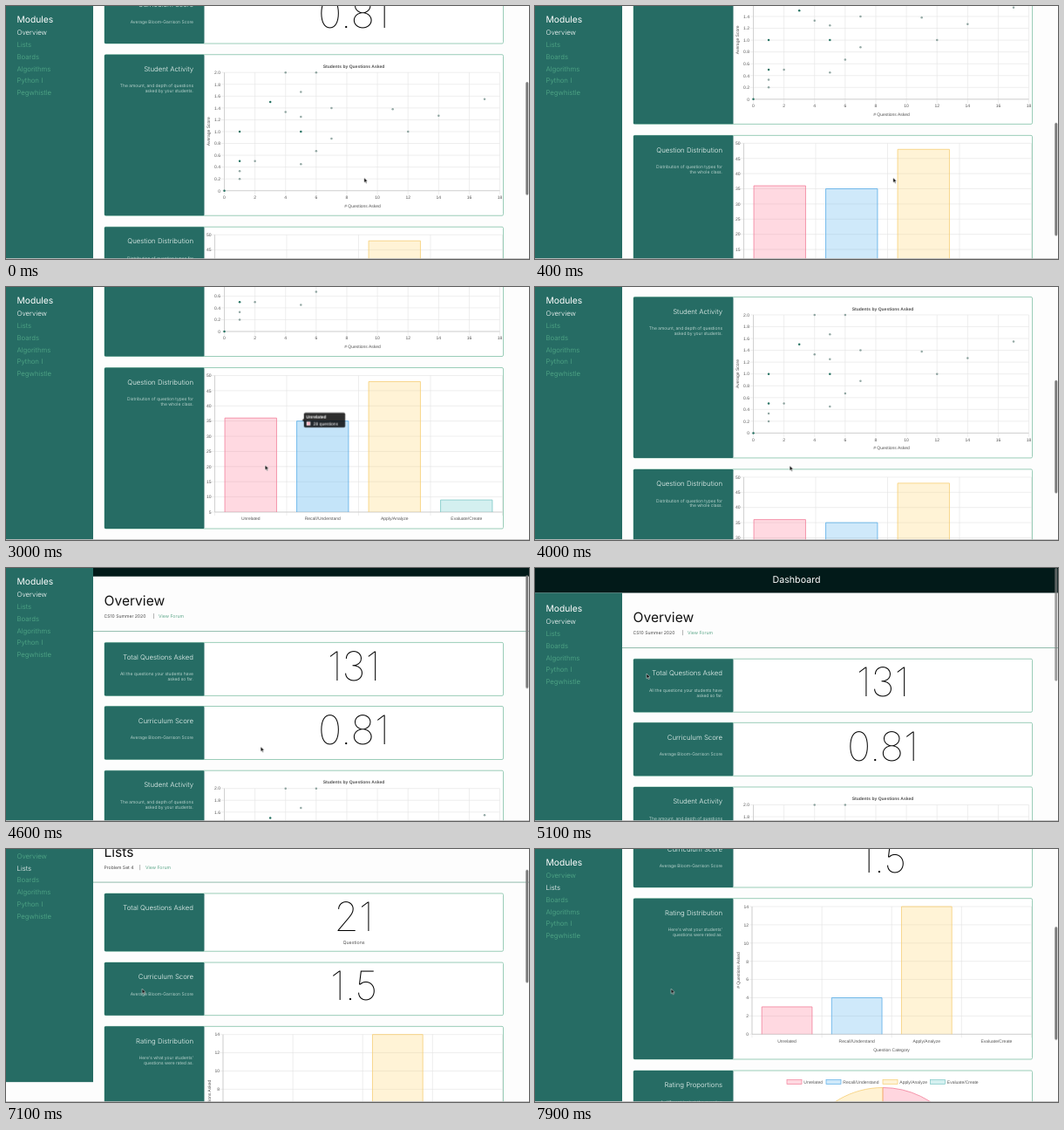
Write an HTML page that moves like this. It is 600 by 290 pixels and loops after 8000 ms.

```html
<!DOCTYPE html>
<html lang="en">
<head>
<meta charset="utf-8">
<title>Dashboard</title>
<style>
@property --s { syntax: "<number>"; inherits: true; initial-value: 0; }
@property --dock { syntax: "<number>"; inherits: true; initial-value: 0; }
html, body { margin: 0; width: 100%; height: 100%; overflow: hidden; background: #fdfdfd; }
svg { display: block; width: 100%; height: 100%; text-rendering: geometricPrecision;
  font-family: Inter, "Open Sans", sans-serif;
  animation: scroll 8s linear infinite, dock 8s step-end infinite; }
.chart, .tip, .status { font: 5px "Liberation Sans", Arial, sans-serif; fill: #555; }
.bold { font-weight: 700; }
.light { font-weight: 300; }
.thin { font-weight: 100; }
.mid { text-anchor: middle; }
.end { text-anchor: end; }
.grid { stroke: #e2e2e2; stroke-width: .6; fill: none; }
.axis { stroke: #c4c4c4; stroke-width: .7; fill: none; }

#scroll { transform: translateY(calc(var(--s) * -1px)); }
#side { transform: translateY(calc(var(--dock) * (31px - var(--s) * 1px))); }
#thumb { transform: translateY(calc(var(--s) * .446px)); animation: thumb 8s linear infinite; }
#pageA { animation: before 8s step-end infinite; }
#pageB { animation: after 8s step-end infinite; }
.link { fill: #55ad8a; font-weight: 300; font-size: 7.8px; }
.link0 { animation: lit 8s step-end infinite; }
.link1 { animation: unlit 8s step-end infinite; }
#cursor { animation: cursor 8s linear infinite; }
#arrow { animation: arrow 8s step-end infinite; }
#hand { animation: hand 8s step-end infinite; }
#tip { animation: tip 8s linear infinite; }
#tip0 { animation: tip0 8s step-end infinite; }
#tip1 { animation: tip1 8s step-end infinite; }
#hover { animation: hover 8s linear infinite; }
#status { animation: status 8s step-end infinite; }

@keyframes scroll {
  0% { --s: 195 } 2.5% { --s: 250 } 5% { --s: 300 } 8.75% { --s: 342 }
  12.5%, 46.25% { --s: 356 } 50% { --s: 240 } 53.75% { --s: 110 } 57.5% { --s: 19 }
  58.75%, 86.875% { --s: 0 } 88.75% { --s: 53 } 90.6% { --s: 105 } 93.1% { --s: 155 }
  96.25% { --s: 188 } 98.75%, 100% { --s: 200 }
}
@keyframes dock { 0% { --dock: 0 } 58% { --dock: 1 } 89.4%, 100% { --dock: 0 } }
@keyframes thumb {
  0%, 18% { opacity: 1 } 21.5%, 46.2% { opacity: 0 } 46.6%, 63% { opacity: 1 }
  66%, 86.9% { opacity: 0 } 87.2%, 100% { opacity: 1 }
}
@keyframes before { 0% { visibility: visible } 72.5%, 100% { visibility: hidden } }
@keyframes after { 0% { visibility: hidden } 72.5%, 100% { visibility: visible } }
@keyframes lit { 0% { fill: #fff } 72.5%, 100% { fill: #55ad8a } }
@keyframes unlit { 0% { fill: #55ad8a } 72.5%, 100% { fill: #fff } }
@keyframes cursor {
  0%, 28% { transform: translate(410.8px, 196.8px) }
  31.5% { transform: translate(391px, 199px) }
  35.8% { transform: translate(312px, 203px) }
  37.5%, 46% { transform: translate(297.3px, 204.2px) }
  50%, 59.5% { transform: translate(292.2px, 204.8px) }
  63% { transform: translate(150px, 130px) }
  67.5%, 78.5% { transform: translate(20.3px, 77px) }
  84%, 100% { transform: translate(156.2px, 160.2px) }
}
@keyframes arrow { 0% { opacity: 1 } 66.3% { opacity: 0 } 79.3%, 100% { opacity: 1 } }
@keyframes hand { 0% { opacity: 0 } 66.3% { opacity: 1 } 79.3%, 100% { opacity: 0 } }
@keyframes tip {
  0%, 31.2% { opacity: 0; transform: translate(366px, 509.7px) }
  34%, 36% { opacity: 1; transform: translate(366px, 509.7px) }
  37.5% { opacity: 1; transform: translate(340px, 508.6px) }
  40%, 45.5% { opacity: 1; transform: translate(283px, 506.2px) }
  46.5%, 100% { opacity: 0; transform: translate(283px, 506.2px) }
}
@keyframes tip0 { 0% { opacity: 0 } 36%, 100% { opacity: 1 } }
@keyframes tip1 { 0% { opacity: 1 } 36%, 100% { opacity: 0 } }
@keyframes hover { 0%, 31% { fill-opacity: .24 } 33%, 38% { fill-opacity: .29 } 40%, 100% { fill-opacity: .24 } }
@keyframes status { 0% { visibility: hidden } 69% { visibility: visible } 80%, 100% { visibility: hidden } }
</style>
</head>
<body>
<svg id="stage" viewBox="0 0 600 290"></svg>
<script>
const GREEN = '#266c64', EDGE = '#8fc8b0';
const KINDS = ['Unrelated', 'Recall/Understand', 'Apply/Analyze', 'Evaluate/Create'];
const TINTS = ['#ff6384', '#36a2eb', '#ffce56', '#4bc0c0'];
const LINE = ['#f27f9a', '#5aaee8', '#f6cf74', '#7cc8c6'];
const range = (n, f) => Array.from({ length: n }, (_, i) => f(i)).join('');

const text = (x, y, str, size, cls = '', fill = '') =>
  `<text x="${x}" y="${y}" class="${cls}"${size ? ` font-size="${size}"` : ''}${fill ? ` fill="${fill}"` : ''}>${str}</text>`;
const rect = (x, y, w, h, fill, more = '') =>
  `<rect x="${x}" y="${y}" width="${w}" height="${h}" fill="${fill}" ${more}/>`;
const path = (d, cls) => `<path d="${d}" class="${cls}"/>`;
const upright = (x, y, str) =>
  `<text class="mid" transform="translate(${x} ${y}) rotate(-90)">${str}</text>`;

function card(y, h, title, notes, big = '') {
  return rect(113, y, 457.5, h, '#fff', `rx="1.5" stroke="${EDGE}" stroke-width=".9"`)
    + rect(113, y, 114.5, h, GREEN, 'rx="1.2"')
    + text(215, y + 19.2, title, 7.8, 'end light', '#eef7f4')
    + notes.map((n, i) => text(215, y + 37.6 + i * 5.9, n, 5, 'end light', '#dcece7')).join('')
    + text(399, y + 43.2, big, 46, 'mid thin', '#000');
}

function scatter(y) {
  const px = v => 250.5 + v * 17.56, py = v => y + 156 - v * 67.75;
  const dots = [[1, .2], [1, .33], [2, .5], [4, 1.33], [4, 2], [5, .45], [5, 1.25], [5, 1.67],
    [6, .67], [6, 2], [7, .88], [7, 1.4], [11, 1.38], [12, 1], [14, 1.27], [17, 1.55]];
  const strong = [[0, 0], [1, .5], [1, 1], [3, 1.5], [5, 1]];
  const dot = (fill, o) => ([a, b]) =>
    `<circle cx="${px(a)}" cy="${py(b)}" r="1.25" fill="${fill}" fill-opacity="${o}"/>`;
  return '<g class="chart">'
    + range(10, i => path(`M${px(2 * i)} ${py(2)}V${py(0) + 4.5}`, 'grid')
      + text(px(2 * i), py(0) + 9.2, 2 * i, 0, 'mid'))
    + range(11, i => path(`M246.5 ${py(i / 5)}H566.5`, 'grid')
      + text(246, py(i / 5) + 1.8, i ? (i / 5).toFixed(1) : 0, 0, 'end'))
    + path(`M250.5 ${py(2)}V${py(0)}H566.5`, 'axis')
    + text(399, y + 15.2, 'Students by Questions Asked', 0, 'mid bold')
    + text(409, y + 175, '# Questions Asked', 0, 'mid')
    + upright(234, y + 88, 'Average Score')
    + dots.map(dot('#4c6f69', .6)).join('') + strong.map(dot('#1d6d5c', .95)).join('')
    + '</g>';
}

function bars(o) {
  const w = (569.5 - o.x) / 4, unit = (o.base - o.top) / (o.max - o.min);
  const py = v => o.base - (v - o.min) * unit;
  const ticks = (o.max - o.min) / o.step + 1;
  let out = range(ticks, i => {
    const v = o.min + i * o.step;
    return path(`M${o.x - 4} ${py(v)}H569.5`, 'grid') + text(o.x - 4, py(v) + 1.8, v, 0, 'end');
  });
  out += range(5, i => path(`M${o.x + i * w} ${o.top}V${o.base + 4}`, 'grid'));
  out += path(`M${o.x} ${o.top}V${o.base}H569.5`, 'axis');
  o.values.forEach((v, i) => {
    const x = o.x + w * (i + .14), bw = w * .72, y = py(v);
    if (v) {
      const id = o.hover === i ? 'id="hover"' : '';
      out += rect(x, y, bw, o.base - y, TINTS[i], `fill-opacity=".24" ${id}`)
        + `<path d="M${x} ${o.base}V${y}h${bw}V${o.base}" fill="none" stroke="${LINE[i]}" stroke-width=".8"/>`;
    }
    out += text(o.x + w * (i + .5), o.base + 9.2, KINDS[i], 0, 'mid');
  });
  return `<g class="chart">${out}</g>`;
}

function pie(cx, cy, r, values) {
  const sum = values.reduce((a, b) => a + b);
  let turn = 0;
  const at = k => `${cx + r * Math.sin(k * 2 * Math.PI)} ${cy - r * Math.cos(k * 2 * Math.PI)}`;
  return values.map((v, i) => {
    const from = turn;
    turn += v / sum;
    return `<path d="M${cx} ${cy}L${at(from)}A${r} ${r} 0 ${v / sum > .5 ? 1 : 0} 1 ${at(turn)}Z" fill="${TINTS[i]}" fill-opacity=".26" stroke="${LINE[i]}" stroke-width=".8"/>`;
  }).join('');
}

const heading = (title, sub) => text(112.5, 62, title, 15.6, '', '#111')
  + text(112.5, 76.3, sub, 5.1, '', '#444');

const legend = y => '<g class="chart">' + [289, 334, 399, 453.5].map((x, i) =>
  rect(x, y, 17, 5, TINTS[i], `fill-opacity=".24" stroke="${LINE[i]}" stroke-width=".7"`)
  + text(x + 19.3, y + 4.4, KINDS[i])).join('') + '</g>';

const tipBody = (i, w, label) => `<g id="tip${i}">`
  + rect(2, -8.6, w, 17.2, '#000', 'rx="1.8" fill-opacity=".82"')
  + '<path d="M2.2 -2L0 0L2.2 2Z" fill="#000" fill-opacity=".82"/>'
  + text(4.6, -2, KINDS[i], 0, 'bold', '#fff')
  + rect(5, 1.7, 4.4, 4.4, '#fff') + rect(5.5, 2.2, 3.4, 3.4, TINTS[i], 'fill-opacity=".5"')
  + `<text x="12.8" y="5.8">${label}</text></g>`;

const pageA = heading('Overview', 'CS10 Summer 2020')
  + text(168.5, 76.3, '|', 5.1, '', '#444') + text(175, 76.3, 'View Forum', 5.2, '', '#5aa688')
  + card(104.2, 61, 'Total Questions Asked', ['All the questions your students have', 'asked so far.'], '131')
  + card(177.3, 61, 'Curriculum Score', ['Average Bloom-Garrison Score'], '0.81')
  + card(251, 184.5, 'Student Activity', ['The amount, and depth of questions', 'asked by your students.'])
  + scatter(251)
  + card(448.5, 184.5, 'Question Distribution', ['Distribution of question types for', 'the whole class.'])
  + bars({ x: 239.5, base: 614, top: 457.5, min: 5, max: 50, step: 5, values: [36, 35, 48, 9], hover: 1 })
  + '<g id="tip" class="tip" style="fill:#fff">' + tipBody(0, 47.5, '28 questions') + tipBody(1, 49, '27 questions') + '</g>';

const pageB = heading('Lists', 'Problem Set 4')
  + text(153, 76.3, '|', 5.1, '', '#444') + text(160, 76.3, 'View Forum', 5.2, '', '#5aa688')
  + card(104.3, 66.3, 'Total Questions Asked', [], '21')
  + text(399, 162.8, 'Questions', 5.3, 'mid', '#555')
  + card(183.4, 60.6, 'Curriculum Score', ['Average Bloom-Garrison Score'], '1.5')
  + card(256.7, 184.3, 'Rating Distribution', ["Here's what your students'", 'questions were rated as.'])
  + bars({ x: 249, base: 412.3, top: 266, min: 0, max: 14, step: 2, values: [3, 4, 14, 0] })
  + '<g class="chart">' + text(409, 431.6, 'Question Category', 0, 'mid')
  + upright(234.5, 339, '# Questions Asked') + '</g>'
  + card(454, 184.3, 'Rating Proportions', ['A different look at the question', 'ratings.'])
  + legend(464.6) + pie(399, 573.5, 100, [3, 4, 14]);

const links = ['Overview', 'Lists', 'Boards', 'Algorithms', 'Python I', 'Pegwhistle'];
const side = rect(0, -2.5, 100, 292, GREEN) + text(12.5, 18.8, 'Modules', 10.3, '', '#fff')
  + links.map((name, i) => text(12.5, 33.1 + i * 13.8, name, 0, `link link${i}`)).join('');

document.getElementById('stage').innerHTML = rect(0, 0, 600, 290, '#fdfdfd')
  + '<g id="scroll">' + rect(0, 0, 600, 28.5, '#021a19')
  + text(300, 16.8, 'Dashboard', 10.7, 'mid', '#fff')
  + rect(100, 91, 500, .9, '#86b5a4')
  + `<g id="pageA">${pageA}</g><g id="pageB">${pageB}</g></g>`
  + `<g id="side">${side}</g>`
  + rect(596.3, 0, 3, 129.5, '#7b7b7b', 'id="thumb" rx="1.5"')
  + rect(0, 289.2, 600, .8, '#b9b9b9')
  + '<g id="status" class="status">' + rect(-2, 281.4, 201.5, 10, '#dedfdf', 'rx="1.5" stroke="#b4b8b7" stroke-width=".6"')
  + text(2, 287.5, 'Waiting for 127.0.0.1...', 0, '', '#333') + '</g>'
  + '<g id="cursor" stroke="#fff" stroke-width=".5" stroke-linejoin="round">'
  + '<path id="arrow" d="M0 0V5.6L1.3 4.4L2.2 6.5L3.2 6.1L2.3 4.1H4Z" fill="#000"/>'
  + '<path id="hand" d="M-.5 .6Q0 -.2 .6 .6V2.6L3.4 3.2Q4 3.5 3.8 4.4L3.2 6.8H.2L-1.7 4.3Q-1.4 3.4 -.5 4.2Z" fill="#fff" stroke="#111"/></g>';
</script>
</body>
</html>
```
